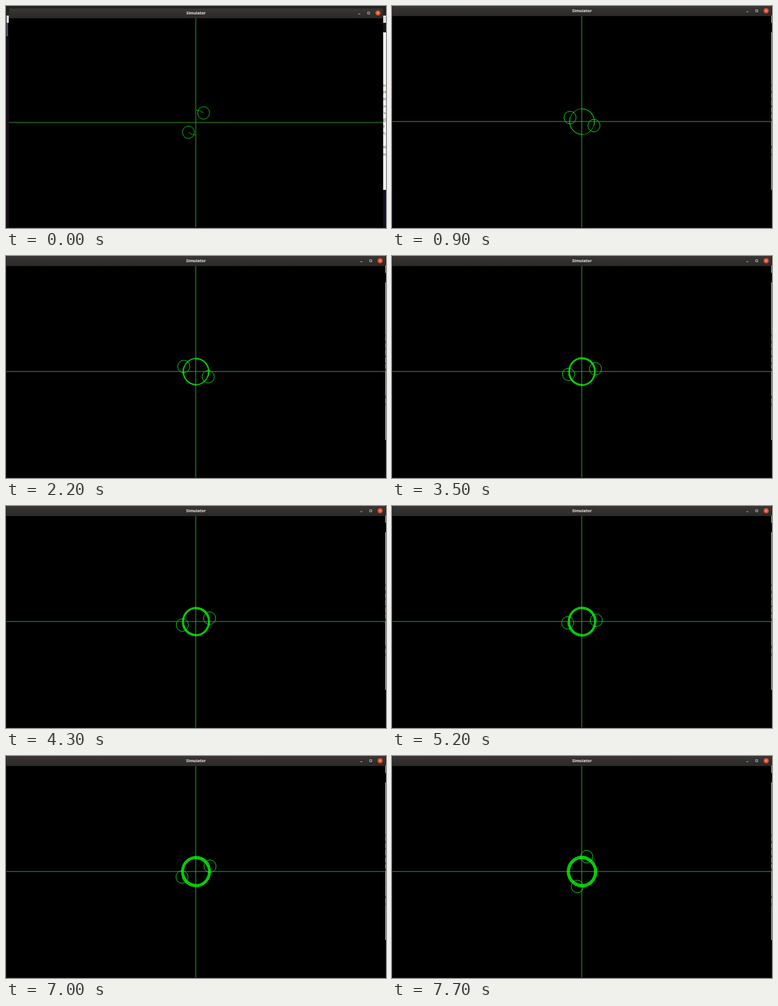
Write an HTML page with a canvas that moves like this. It is 676x396 px and loops after 7800 ms.

```html
<!DOCTYPE html>
<html lang="en">
<head>
<meta charset="utf-8">
<title>Simulator</title>
<style>
  html, body { margin: 0; width: 100%; height: 100%; overflow: hidden; background: #170e1a; }
  #stage { position: relative; width: 676px; height: 396px; overflow: hidden; background: #170e1a; }
  #stage > * { position: absolute; }
  #top { left: 0; top: 0; width: 676px; height: 17px; background: #222120; }
  #tabs { left: 1px; top: 17px; width: 675px; height: 13px; background: #dcdbda; }
  #side { left: 1px; top: 30px; width: 2px; height: 24px; background: #4d7478; }
  #desk { left: 600px; top: 30px; width: 76px; height: 366px; background: #11111f; }
  #page { left: 600px; top: 47px; width: 76px; height: 281px; background: #f0f0f0; overflow: hidden; }
  #page span { position: absolute; left: 69.5px; font: 8px/12px "Open Sans", sans-serif; color: #444; white-space: pre; }
  #page span:first-child { color: #278a3c; }
  #win { left: 1px; top: 0; width: 674px; height: 395px; background: #000; transform-origin: 337px 0; }
  #win.opening { transform: translateY(4.2px) scale(.988); }
  #bar { position: absolute; left: 0; top: 0; width: 674px; height: 17.5px; background: linear-gradient(#393635, #2b2928); }
  #bar b { position: absolute; left: 0; width: 100%; top: 0; text-align: center;
    font: 700 7.1px/17.5px "Open Sans", "Noto Sans", sans-serif; color: #f0efee; }
  #bar svg { position: absolute; left: 624px; top: 0; }
  canvas { position: absolute; left: -1px; top: 0; }
</style>
</head>
<body>
<div id="stage">
  <div id="top"></div>
  <div id="tabs"></div>
  <div id="desk"></div>
  <div id="side"></div>
  <div id="page"></div>
  <div id="win" class="opening">
    <canvas width="676" height="395"></canvas>
    <div id="bar">
      <b>Simulator</b>
      <svg width="50" height="17" fill="none" stroke="#d4d2d0" stroke-width=".9">
        <path d="M5.3 10.2h3.6M22 6.7h3.6v3.6h-3.6z"/>
        <circle cx="40.6" cy="8.4" r="4.6" fill="#e5502a" stroke="none"/>
        <path d="M39.1 6.9l3 3m0-3l-3 3" stroke="#fbe3da"/>
      </svg>
    </div>
  </div>
</div>
<script>
const LOOP = 7800, STEP = 100;
const CX = 338, CY = 206.2, SQUEEZE = 0.965, BODY = 11;

// Orbit angle in degrees, clockwise from the top, at a few moments (ms).
const TIMES = [0, 900, 2200, 3500, 5200, 6300, 7700];
const ANGLES = [39, 288, 652, 978.8, 1345, 1559.6, 1818];

const win = document.getElementById('win');
const page = document.getElementById('page');
const ctx = document.querySelector('canvas').getContext('2d');

[[141, 'as'], [153, 'et'], [165, 'as'], [178, 'pe'], [190, 'na'],
 [202, 'g)'], [214, 'e p'], [226, 'e,'], [251, 'at'], [264, 'ec']].forEach(([y, text]) => {
  const line = document.createElement('span');
  line.textContent = text;
  line.style.top = y - 53 + 'px';
  page.append(line);
});

function slope(i) {
  const a = Math.max(i - 1, 0), b = Math.min(i + 1, TIMES.length - 1);
  return (ANGLES[b] - ANGLES[a]) / (TIMES[b] - TIMES[a]);
}

// Cubic Hermite interpolation keeps the angular speed smooth.
function angleAt(t) {
  let i = 0;
  while (i < TIMES.length - 2 && t > TIMES[i + 1]) i++;
  const h = TIMES[i + 1] - TIMES[i], u = (t - TIMES[i]) / h, v = 1 - u;
  return ANGLES[i] * v * v * (1 + 2 * u) + ANGLES[i + 1] * u * u * (3 - 2 * u)
    + h * u * v * (slope(i) * v - slope(i + 1) * u);
}

function place(deg, side, ripple) {
  const a = deg * Math.PI / 180;
  const r = side * (22.3 + deg * 0.0031 + ripple * Math.sin(a * 47.3));
  return [CX + r * Math.sin(a) * SQUEEZE, CY - r * Math.cos(a)];
}

function drawTrail(end, side) {
  ctx.beginPath();
  for (let d = 0; d < end; d++) ctx.lineTo(...place(d, side, 0.35));
  ctx.lineTo(...place(end, side, 0));
  ctx.strokeStyle = '#0cff0c';
  ctx.lineWidth = 1;
  ctx.setLineDash([2.6, 0.5]);
  ctx.stroke();
  ctx.setLineDash([]);
}

function drawBody(end, side) {
  const [x, y] = place(end, side, 0);
  ctx.beginPath();
  ctx.ellipse(x, y, BODY * 0.98, BODY * 1.02, 0, 0, 7);
  ctx.strokeStyle = '#16e81e';
  ctx.lineWidth = 1;
  ctx.stroke();
}

function draw(t) {
  const end = angleAt(t);
  win.classList.toggle('opening', t < STEP);
  ctx.clearRect(0, 0, 676, 395);
  ctx.fillStyle = '#2c9a36';
  ctx.fillRect(337, 17, 1.2, 378);
  ctx.fillRect(1, 205.4, 674, 1.2);
  for (const side of [1, -1]) {
    drawTrail(end, side);
    drawBody(end, side);
  }
}

let shown = -1;
function tick() {
  const t = Math.floor(performance.now() % LOOP / STEP) * STEP;
  if (t !== shown) draw(shown = t);
  requestAnimationFrame(tick);
}
tick();
</script>
</body>
</html>
```
